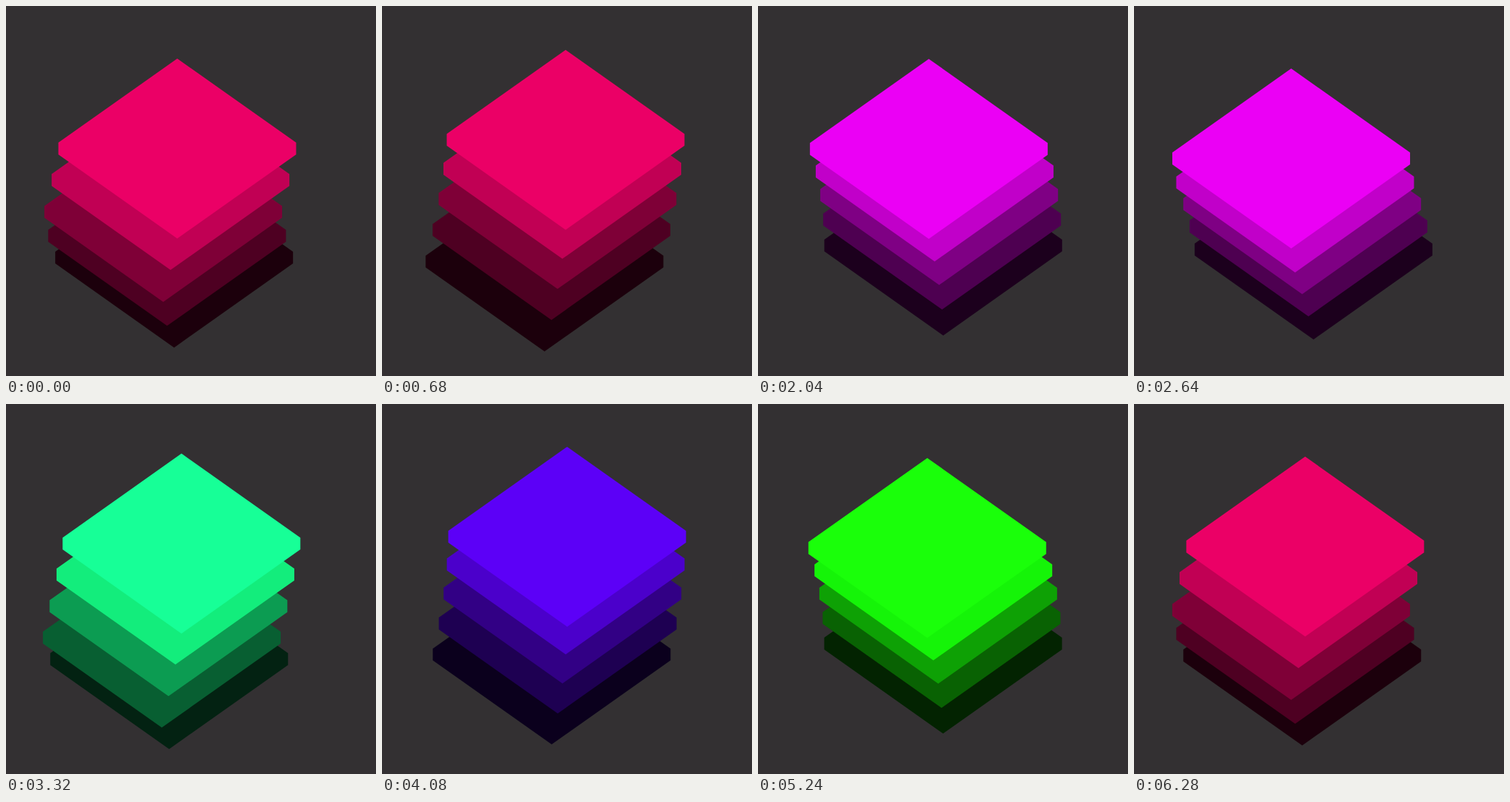
Recreate the animation shown at these times as an HTML page. Size 512 by 512 pixels, loop 6320 ms.

```html
<!DOCTYPE html>
<html lang="en">
<head>
<meta charset="utf-8">
<title>Sliding stack</title>
<style>
  html, body { margin: 0; width: 100%; height: 100%; overflow: hidden; background: #333032; }
  svg { display: block; width: 100vw; height: 100vh; }
</style>
</head>
<body>
<svg id="stage" viewBox="0 0 512 512"></svg>
<script>
const LOOP = 6320, STEP = 40;
const HALF_W = 164.5, HALF_H = HALF_W * Math.SQRT1_2, THICK = 16.4;
const BASE_X = 50.6, BASE_Y = 88.2, GAP = 36.95, SLIDE = 41.2;
const SHADES = [1, 0.82, 0.54, 0.33, 0.118];
// Channels above 255 are clipped only after shading.
const COLORS = [
  [235, 0, 102], [167, 283, 9], [235, 0, 245],
  [23, 289, 151], [92, 0, 247], [26, 298, 10]
];

const stage = document.getElementById("stage");
const slabs = SHADES.map(() => {
  const slab = document.createElementNS("http://www.w3.org/2000/svg", "polygon");
  stage.prepend(slab);
  return slab;
});

function outline(left, top) {
  const mid = left + HALF_W, right = left + 2 * HALF_W, side = top + HALF_H;
  return [
    [mid, top], [right, side], [right, side + THICK],
    [mid, top + 2 * HALF_H + THICK], [left, side + THICK], [left, side]
  ].map(p => p.map(v => v.toFixed(2)).join()).join(" ");
}

function render(ms) {
  const t = Math.floor((ms % LOOP) / STEP) * STEP / 1000;
  const color = COLORS[Math.floor((t + 0.31) / (Math.PI / 3)) % COLORS.length];
  slabs.forEach((slab, i) => {
    const shift = SLIDE * Math.abs(Math.sin(t + 0.56 - 0.25 * i));
    slab.setAttribute("points",
      outline(BASE_X + shift, BASE_Y + GAP * i - shift * Math.SQRT1_2));
    const rgb = color.map(c => Math.min(255, Math.round(c * SHADES[i])));
    slab.setAttribute("fill", `rgb(${rgb})`);
  });
}

const start = performance.now();
function tick() {
  render(performance.now() - start);
  requestAnimationFrame(tick);
}
tick();
</script>
</body>
</html>
```
